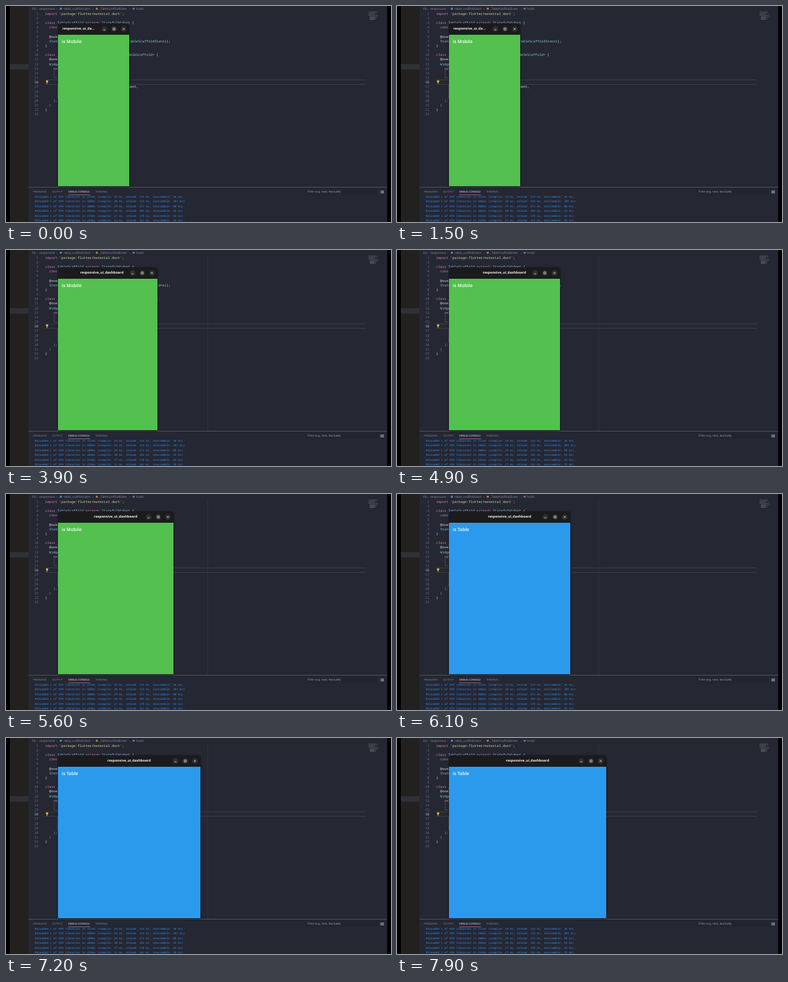
Recreate the animation shown at these times as an HTML page. Size 600x338 px, loop 8000 ms.

```html
<!DOCTYPE html>
<html lang="en">
<head>
<meta charset="utf-8">
<title>Responsive window resize</title>
<style>
  html, body { margin: 0; width: 100%; height: 100%; overflow: hidden; background: #000; }
  #stage { position: absolute; left: 0; top: 0; width: 600px; height: 338px; overflow: hidden; text-rendering: geometricPrecision; }
  svg { position: absolute; left: 0; top: 0; }
  svg text { white-space: pre; }
  .code { font: 5.26px "Noto Sans Mono", "DejaVu Sans Mono", monospace; }
  .log { font: 4.39px "Noto Sans Mono", "DejaVu Sans Mono", monospace; fill: #338ee8; }
  .crumb { font: 4.8px "Open Sans", "Noto Sans", sans-serif; fill: #8a8d9b; }
  .tab { font: 4.1px "Open Sans", "Noto Sans", sans-serif; fill: #858896; }
  .filter { font: 4.6px "Open Sans", "Noto Sans", sans-serif; fill: #a3a5b0; }
  #win {
    position: absolute; left: 81px; top: 27px; height: 255px; overflow: hidden;
    border-radius: 4px 4px 0 0; background: #1b1b1e; box-shadow: 0 1px 3px rgba(0, 0, 0, .6);
    font-family: "Open Sans", "Noto Sans", sans-serif; font-weight: 700; color: #fff;
  }
  #title {
    position: absolute; top: 4.4px; font-size: 5.42px; line-height: 9px; color: #f0f0f0;
    white-space: nowrap; overflow: hidden; text-overflow: ellipsis;
  }
  #buttons { position: absolute; right: 0; top: 0; width: 48px; height: 18px; }
  #body { position: absolute; left: 0; right: 0; top: 18px; bottom: 0; }
  #label { position: absolute; left: 6px; top: 6px; font-size: 7.15px; font-weight: 600; line-height: 10px; white-space: nowrap; }
</style>
</head>
<body>
<div id="stage">
  <svg id="editor" width="600" height="338">
    <rect x="6" width="588" height="338" fill="#252733"/>
    <rect x="6" width="29" height="338" fill="#222120"/>
    <rect x="6" y="91" width="29" height="8.5" fill="#303136"/>
    <path id="ruler" d="M314.5 9V283" stroke="#303341"/>
    <path d="M61 115.7H562M61 122.6H562" stroke="#414453" stroke-width=".8"/>
    <path d="M75 101V112.5H80M80.3 123V145" fill="none" stroke="#5c5f70" stroke-width=".6"/>
    <circle cx="64" cy="118" r="1.8" fill="#f0c62f"/>
    <rect x="63.2" y="119.6" width="1.6" height="1.8" fill="#d8a92c"/>
    <rect x="35" y="283" width="559" height="1" fill="#50525e"/>
    <path d="M97 295.5H131" stroke="#b56a93" stroke-width=".8"/>
    <rect x="466" y="286.5" width="113" height="8.5" fill="#222430"/>
    <path d="M583.5 289.5H589M583.5 291H589M583.5 292.5H589" stroke="#b3b5c0" stroke-width=".8"/>
  </svg>
  <div id="win">
    <div id="title">responsive_ui_dashboard</div>
    <svg id="buttons" viewBox="0 0 48 18" style="left:auto">
      <g fill="#303033">
        <circle cx="9.2" cy="9" r="4.4"/><circle cx="24.4" cy="9" r="4.4"/><circle cx="39.4" cy="9" r="4.4"/>
      </g>
      <path d="M7.6 10.2H10.8M22.9 7.5H25.9V10.5H22.9ZM38 7.6L40.8 10.4M40.8 7.6L38 10.4" fill="none" stroke="#f0f0f0" stroke-width=".75"/>
    </svg>
    <div id="body"><div id="label"></div></div>
  </div>
</div>
<script>
const $ = id => document.getElementById(id);
const editor = $('editor');

function add(tag, attrs, text, parent = editor) {
  const el = document.createElementNS('http://www.w3.org/2000/svg', tag);
  for (const key in attrs) el.setAttribute(key, attrs[key]);
  if (text) el.textContent = text;
  return parent.appendChild(el);
}
const put = (cls, x, y, text, attrs) => add('text', { class: cls, x, y, ...attrs }, text);

// Editor
const CHAR = 3.157;
const lineY = n => 13.8 + (n - 1) * 7.16;
const white = '#dfe1e8', pink = '#d97fb2', cyan = '#86c8d8', green = '#70c98a',
      yellow = '#d5d69a', violet = '#a78bd0', blue = '#7ba6d9';
const code = {
  1: [0, 'import ', pink, "'package:flutter/material.dart'", yellow, ';', white],
  3: [0, 'class ', pink, 'TableScaffold ', cyan, 'extends ', pink, 'StatefulWidget ', cyan, '{', white],
  4: [2, 'const ', pink, 'TableScaffold', green, '({super.key});', white],
  6: [2, '@override', white],
  7: [2, 'State', cyan, '<', white, 'TableScaffold', cyan, '> ', white, 'createState', green,
      '() ', white, '=> ', pink, '_TableScaffoldState', cyan, '();', white],
  8: [0, '}', white],
  10: [0, 'class ', pink, '_TableScaffoldState ', cyan, 'extends ', pink, 'State', cyan, '<', white,
       'TableScaffold', cyan, '> {', white],
  11: [2, '@override', white],
  12: [2, 'Widget ', cyan, 'build', green, '(BuildContext context) {', white],
  13: [4, 'return ', pink, 'Scaffold(', cyan],
  17: [10, 'backgroundColor: Colors.transparent,', white],
  20: [4, ');', blue],
  21: [2, '}', violet],
  22: [0, '}', white]
};
for (let n = 1; n <= 23; n++) {
  put('code', 50.5, lineY(n), String(n), { 'text-anchor': 'end', fill: n === 16 ? '#c8cad4' : '#6b6f82' });
  if (!code[n]) continue;
  const [indent, ...tokens] = code[n];
  const line = put('code', 61 + indent * CHAR, lineY(n));
  for (let i = 0; i < tokens.length; i += 2) add('tspan', { fill: tokens[i + 1] }, tokens[i], line);
}

// Breadcrumbs
[[41, 'lib'], [52, 'responsive'], [90, 'table_scaffold.dart'], [145, '_TableScaffoldState'], [203, 'build']]
  .forEach(([x, text]) => put('crumb', x, 5.9, text));
[47.5, 78.5, 134.5, 193].forEach(x => put('crumb', x, 5.7, '›'));
[[85.5, '#4a93bd'], [141.5, '#a98052'], [199, '#83649c']]
  .forEach(([cx, fill]) => add('circle', { cx, cy: 4.2, r: 1.7, fill }));

// Minimap
[13, 0, 14, 10, 0, 9, 15, 0, 13, 8, 11, 7, 10, 6].forEach((width, i) =>
  add('rect', { x: 565 + (i > 7 ? 2 : 0), y: 8.8 + i * .95, width, height: .5, fill: i % 3 ? '#5c6675' : '#75755f' }));

// Bottom panel
[[42, 'PROBLEMS'], [72, 'OUTPUT'], [97, 'DEBUG CONSOLE'], [139, 'TERMINAL']].forEach(([x, text], i) =>
  put('tab', x, 292.4, text, i === 2 ? { style: 'fill:#eeeef2' } : {}));
put('filter', 470, 292.4, 'Filter (e.g. text, !exclude)');
const clip = add('clipPath', { id: 'logClip' });
add('rect', { x: 35, y: 296.8, width: 559, height: 42 }, '', clip);
const logs = add('g', { 'clip-path': 'url(#logClip)' });
[[311, 29, 123, 36], [406, 28, 123, 381], [300, 29, 371, 80], [202, 20, 102, 33], [235, 27, 178, 43], [234, 21, 161, 34]]
  .forEach(([total, compile, reload, reassemble], i) => add('text', { class: 'log', x: 45, y: 300 + i * 7.45 },
    `Reloaded 1 of 599 libraries in ${total}ms (compile: ${compile} ms, reload: ${reload} ms, reassemble: ${reassemble} ms).`, logs));

// Window: right edge over time
const LOOP = 8000, STEP = 100, LEFT = 81, TITLE_WIDTH = 67.9, RULER_START = 1600;
const edges = [[0, 192], [2300, 192], [2800, 203], [3800, 203], [3900, 236], [4200, 247], [4300, 247],
  [5200, 257], [5600, 261], [6100, 270], [6600, 283], [7000, 296], [7200, 303], [7300, 303], [7900, 326], [8000, 326]];

function edgeAt(t) {
  const i = edges.findIndex(([time]) => time > t);
  const [t0, x0] = edges[i - 1], [t1, x1] = edges[i];
  return x0 + (x1 - x0) * (t - t0) / (t1 - t0);
}

function draw(t) {
  const right = Math.round(edgeAt(t)), width = right - LEFT;
  const limit = width - 52.5;
  const titleX = Math.max(7, Math.min((width - TITLE_WIDTH) / 2, limit - TITLE_WIDTH));
  const isTable = right >= 264;
  $('win').style.width = width + 'px';
  $('title').style.left = titleX + 'px';
  $('title').style.maxWidth = limit - titleX + 'px';
  $('body').style.background = isTable ? '#2b9aec' : '#53c050';
  $('label').textContent = isTable ? 'is Table' : 'is Mobile';
  $('ruler').style.opacity = t < RULER_START ? 0 : 1;
}

const start = performance.now();
function tick() {
  const t = (performance.now() - start) % LOOP;
  draw(Math.floor(t / STEP) * STEP);
  requestAnimationFrame(tick);
}
tick();
</script>
</body>
</html>
```
